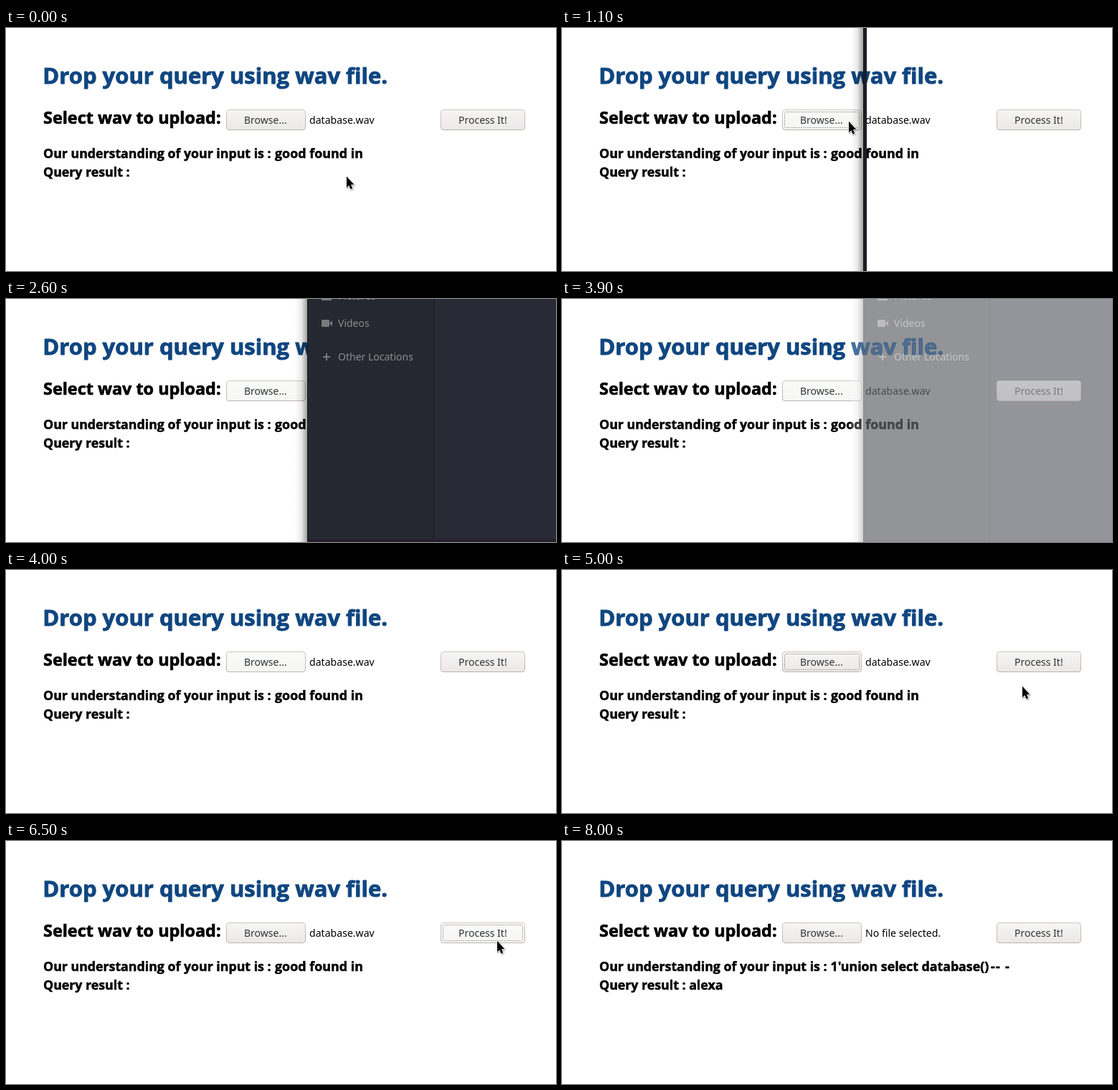
Recreate the animation shown at these times as an HTML page with a canvas. Size 767 by 340 pixels, loop 9.9 s.

```html
<!DOCTYPE html>
<html lang="en">
<head>
<meta charset="utf-8">
<title>Wav query form</title>
<style>
  html, body { margin: 0; width: 100%; height: 100%; overflow: hidden; background: #fff; }
  canvas { display: block; width: 767px; height: 340px; }
</style>
</head>
<body>
<canvas id="stage" width="767" height="340"></canvas>
<script>
const ctx = document.getElementById("stage").getContext("2d");
const W = 767, H = 340, LOOP = 9900, STEP = 100;
const HEAD = '"Open Sans", "Noto Sans", sans-serif';
const UI = '"Noto Sans", "Open Sans", sans-serif';

const clamp = v => Math.max(0, Math.min(1, v));
const smooth = p => p * p * (3 - 2 * p);
const easeOut = p => 1 - (1 - p) ** 2;
const mix = (a, b, p) => a + (b - a) * p;
const between = (t, a, b) => t >= a && t < b;

function text(str, x, y, size, color, weight = 400, family = UI) {
  ctx.font = `${weight} ${size}px ${family}`;
  ctx.fillStyle = color;
  ctx.fillText(str, x, y);
}

// Heavy rounded heading: bold text thickened by a fine outline.
function head(str, x, y, size, color = "#000") {
  text(str, x, y, size, color, 700, HEAD);
  ctx.lineJoin = "round";
  ctx.lineWidth = size * 0.028;
  ctx.strokeStyle = color;
  ctx.strokeText(str, x, y);
}

function fill(color, x, y, w, h) {
  ctx.fillStyle = color;
  ctx.fillRect(x, y, w, h);
}

function gradient(x0, y0, x1, y1, from, to) {
  const g = ctx.createLinearGradient(x0, y0, x1, y1);
  g.addColorStop(0, from);
  g.addColorStop(1, to);
  return g;
}

function button(x, w, label, labelX, hover, focus) {
  const y = 114, h = 29;
  ctx.beginPath();
  ctx.roundRect(x + 0.5, y + 0.5, w - 1, h - 1, 3.5);
  ctx.fillStyle = hover
    ? gradient(0, y, 0, y + h, "#f9f9f8", "#f6f6f5")
    : gradient(0, y, 0, y + h, "#f6f5f4", "#ebe9e7");
  ctx.fill();
  ctx.lineWidth = 1;
  ctx.strokeStyle = gradient(0, y, 0, y + h, "#cdc7c2", "#bab2aa");
  ctx.stroke();
  if (focus) {
    ctx.beginPath();
    ctx.roundRect(x + 3.5, y + 3.5, w - 7, h - 7, 2);
    ctx.strokeStyle = "#a3a2a0";
    ctx.setLineDash([2, 1]);
    ctx.stroke();
    ctx.setLineDash([]);
  }
  text(label, labelX, 134, 14, "#2e3436");
}

function page(t) {
  const done = t >= 8000;
  fill("#fff", 0, 0, W, H);
  head("Drop your query using wav file.", 51.3, 77.5, 31, "#104680");
  head("Select wav to upload:", 52, 134, 23.4);
  button(307, 111, "Browse...", 332, between(t, 900, 4100),
    between(t, 1000, 1200) || between(t, 4100, 5700));
  text(done ? "No file selected." : "database.wav", 423, 134, 14.1, "#000");
  button(606, 118, "Process It!", 631, between(t, 5700, 8000), between(t, 5800, 8000));

  head("Our understanding of your input is :", 52, 182, 17.75);
  if (done) {
    head("1'union select database()", 374.5, 182, 17.75);
    ctx.letterSpacing = "1.3px";
    head("-- -", 598, 182, 17.75);
    ctx.letterSpacing = "0px";
  } else {
    head("good found in", 375, 182, 17.9);
  }
  head("Query result :" + (done ? " alexa" : ""), 52, 208, 17.75);
}

function shadow() {
  const g = ctx.createLinearGradient(403, 0, 420, 0);
  g.addColorStop(0, "rgba(0,0,0,0)");
  g.addColorStop(0.5, "rgba(0,0,0,0.08)");
  g.addColorStop(1, "rgba(0,0,0,0.36)");
  fill(g, 403, 0, 17, H);
}

function sidebar(dim) {
  const grey = (from, to) => {
    const v = Math.round(mix(from, to, dim));
    return `rgb(${v},${v},${v + 2})`;
  };
  const label = grey(236, 141), icon = grey(200, 122);

  fill(icon, 440, -9, 14, 11);
  text("Pictures", 463, 1, 14, label);

  ctx.fillStyle = icon;
  ctx.beginPath();
  ctx.roundRect(440, 29, 11, 10, 1.5);
  ctx.moveTo(451, 34);
  ctx.lineTo(455, 30);
  ctx.lineTo(455, 38);
  ctx.fill();
  text("Videos", 463, 39, 14, label);

  fill(icon, 442, 80, 10, 2);
  fill(icon, 446, 76, 2, 10);
  text("Other Locations", 463, 86, 14, label);
}

function dialog(t) {
  if (!between(t, 1100, 4000)) return;
  shadow();
  if (t < 1200) {
    fill("#1b1e26", 420, 0, 5, H);
    fill("#11131a", 420, 0, 1, H);
    return;
  }
  fill("#252830", 420, 0, 176, H);
  fill("#292a35", 597, 0, 170, H);
  fill("#16171d", 596, 0, 1, H);
  fill("#17191f", 420, 0, 1, H);
  fill("#23262e", 421, 57, 175, 1);
  fill("#271e2c", 420, 336, 347, 4);
  sidebar(t < 2300 ? 0 : t < 2400 ? 0.4 : t < 2600 ? 0.8 : 1);
  if (t >= 3900) fadeOut(t);
}

// Lets the page show through the closing dialog.
function fadeOut(t) {
  ctx.save();
  ctx.beginPath();
  ctx.rect(403, 0, W - 403, H);
  ctx.clip();
  ctx.globalAlpha = 0.5;
  page(t);
  ctx.restore();
}

// Tip of the mouse pointer, or null while it is off stage.
function pointer(t) {
  if (t < 1600) {
    const p = smooth(clamp((t - 200) / 500));
    return [mix(475, 400, p), mix(207, 130, p)];
  }
  if (t < 1900) {
    const p = (t - 1500) / 300;
    return [mix(400, 614, p), mix(130, 12, p)];
  }
  if (between(t, 4600, 6400)) {
    const p = easeOut(clamp((t - 4600) / 700));
    return [mix(506, 673, p), mix(313, 128, p)];
  }
  if (between(t, 6400, 8000)) {
    const p = clamp((t - 6300) / 200);
    return [mix(673, 685, p), mix(128, 139, p)];
  }
  return null;
}

function arrow([x, y]) {
  const shape = [[0, 0], [0, 15.5], [3.3, 12.4], [5.6, 17.6], [8.2, 16.5], [5.9, 11.4], [10.3, 11.2]];
  ctx.save();
  ctx.translate(Math.round(x), Math.round(y) + 0.8);
  ctx.beginPath();
  shape.forEach(([px, py]) => ctx.lineTo(px, py));
  ctx.closePath();
  ctx.lineJoin = "round";
  ctx.lineWidth = 1.4;
  ctx.strokeStyle = "#fff";
  ctx.shadowColor = "rgba(0,0,0,0.5)";
  ctx.shadowBlur = 2;
  ctx.shadowOffsetX = 0.6;
  ctx.shadowOffsetY = 1;
  ctx.stroke();
  ctx.shadowColor = "transparent";
  ctx.fillStyle = "#000";
  ctx.fill();
  ctx.restore();
}

const start = performance.now();

function draw() {
  const now = Math.max(0, performance.now() - start) % LOOP;
  const t = Math.floor(now / STEP) * STEP;
  page(t);
  dialog(t);
  const tip = pointer(t);
  if (tip) arrow(tip);
  requestAnimationFrame(draw);
}

draw();
</script>
</body>
</html>
```
